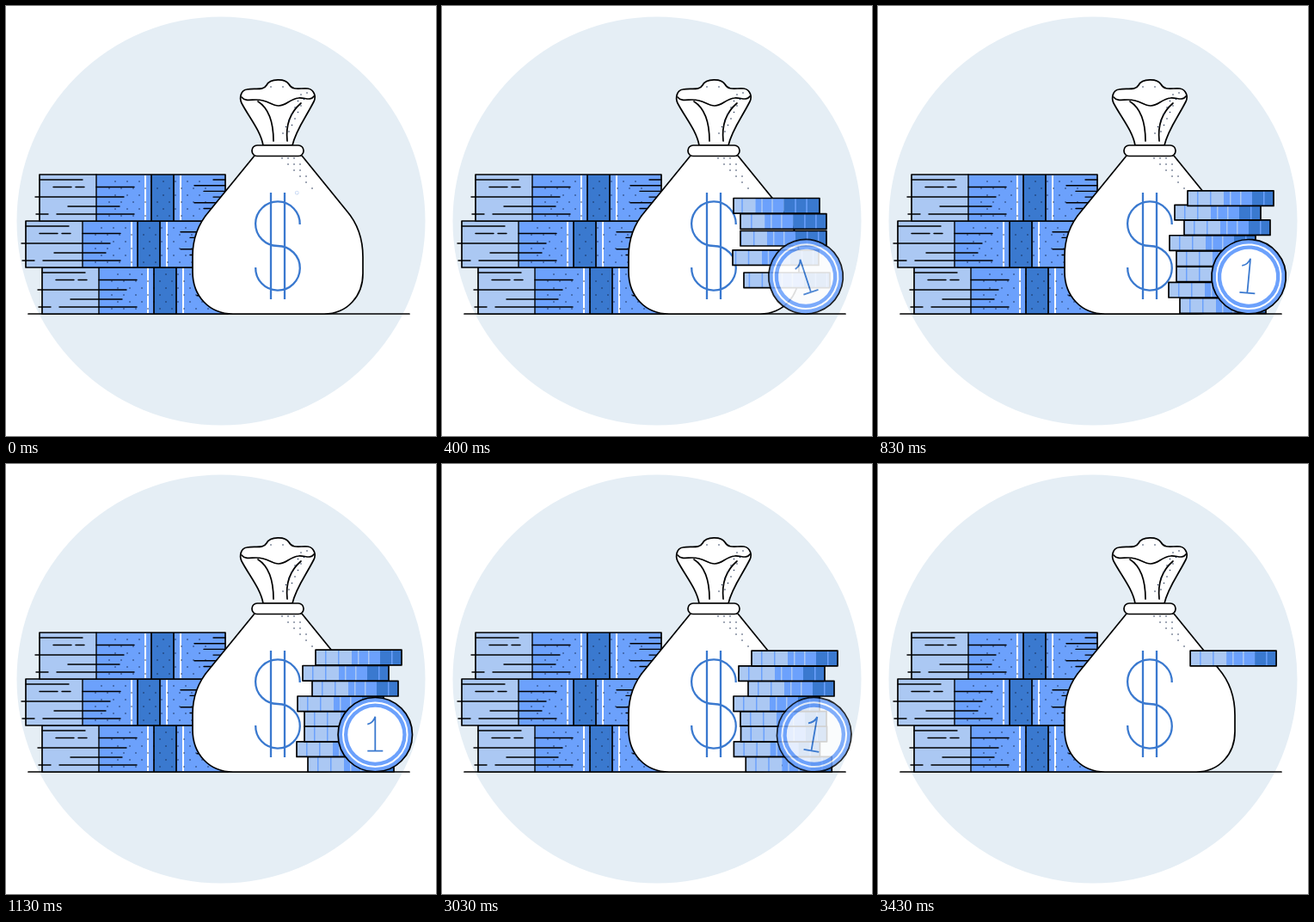
These frames come from a looping animation (500 by 500 pixels, 3.46 s). An HTML page:

```html
<!DOCTYPE html>
<html lang="en">
<head>
<meta charset="utf-8">
<title>Savings</title>
<style>
  html, body { margin: 0; width: 100%; height: 100%; overflow: hidden; background: #fff; }
  svg { display: block; width: 100vw; height: 100vh; }
  .ink { stroke: #000; stroke-width: 1.7; stroke-linecap: round; stroke-linejoin: round; }
  .thin { stroke-width: 1.4; }
  .open { fill: none; }
  .light { fill: #abc8f3; }
  .mid { fill: #6ca1fc; }
  .dark { fill: #3a79cf; }
  .blue { fill: none; stroke: #3a79cf; }
  .white { fill: none; stroke: #fff; stroke-width: 2; }
</style>
</head>
<body>
<svg viewBox="0 0 500 500">
  <defs>
    <g id="bundle">
      <path class="light" d="M0 0H66V54H0z"/>
      <path class="mid" d="M66 0H216V54H66z"/>
      <path class="dark" d="M130 0H156V54H130z"/>
      <path class="white" d="M123 1V53M164 1V53"/>
      <g id="specks"></g>
      <path class="ink open" d="M0 0H216V54H0zM130 0V54M156 0V54"/>
      <path class="ink open thin" d="M66 0V54"/>
      <path class="ink open thin" d="M0 6H50M16 14.5H37M42 14.5H52M66 14.5H110
        M-5 26H98M33 37H93M-4 46H10M20 46H110"/>
      <g id="edges" class="ink thin"></g>
    </g>
    <clipPath id="rim"><path d="M0 0H100V17.6H0z"/></clipPath>
  </defs>

  <circle cx="250" cy="250" r="237.5" fill="#e5eef5"/>
  <path class="ink" d="M26 358H469"/>
  <use href="#bundle" x="42" y="304"/>
  <use href="#bundle" x="23" y="250"/>
  <use href="#bundle" x="39" y="196"/>

  <g class="ink" fill="#fff">
    <path d="M289 174L236 239C223 254 217 270 217 291V309C217 337 236 358 264 358H370C397 358 415 337 415 311V292C415 270 409 253 396 238L344 174z"/>
    <path d="M299 162C296 145 283 130 274 113C271 107 273 98 280 97C290 95 299 99 303 92C307 84 325 84 329 91C333 99 343 95 351 96C358 97 361 105 358 111C349 129 337 144 333 162z"/>
    <path class="open" d="M274 106C278 111 284 109 291 109C305 109 308 116 317 116C326 116 330 108 340 107C347 106 354 111 358 105"/>
    <path class="open" d="M293 111C307 120 311 137 311 157M343 113C330 124 325 138 327 157"/>
    <rect x="286" y="162" width="60" height="12.5" rx="6"/>
  </g>
  <g id="shade"></g>
  <path class="blue" stroke-width="2.3" d="M308 217V341M324 217V341
    M341.7 254A25.8 25.8 0 1 0 316 279A25.8 25.8 0 1 1 290.2 304"/>

  <g id="pile"></g>
  <g id="coin">
    <circle class="mid ink" r="43.2"/>
    <circle class="white" r="37.3"/>
    <circle r="32" fill="#fff"/>
    <path class="blue" stroke-width="1.8" d="M-9 -12Q-2 -14 0 -21V19M-9 19H9"/>
  </g>
</svg>
<script>
const LOOP = 3460, FALL = 292;
const byId = id => document.getElementById(id);
const ramp = (t, from, to) => Math.min(1, Math.max(0, (t - from) / (to - from)));
const smooth = p => p * p * (3 - 2 * p);
const mix = (a, b, p) => a + (b - a) * p;

function add(parent, tag, attrs) {
  const el = document.createElementNS('http://www.w3.org/2000/svg', tag);
  for (const key in attrs) el.setAttribute(key, attrs[key]);
  parent.appendChild(el);
  return el;
}

const speck = (id, cx, cy) => add(byId(id), 'circle', { cx, cy, r: 0.75, fill: '#14264a' });

// Staggered dots and short strokes on the banknotes.
for (let row = 0; row < 6; row++) {
  for (let x = 88 - (row % 2) * 7; x < 200; x += 14) speck('specks', x, 8 + row * 8);
}
for (let i = 0; i < 7; i++) {
  const x = 202 - (i * 2 % 3) * 11;
  add(byId('edges'), 'path', { d: `M${x} ${6 + i * 6.7}H${i % 3 ? 216 : x + 14}` });
}

// Bag shading: rim, neck, then a tapering patch on the shoulder.
speck('shade', 308, 94);
speck('shade', 322, 94);
for (let i = 0; i < 7; i++) {
  for (let j = 0; j < 2; j++) speck('shade', 350 - i * 3.5 - j * 7, 101 + i * 7.5 + j * 2);
}
for (let i = 0; i < 6; i++) {
  for (let j = 0; j < 3 - i / 2; j++) speck('shade', 321 + (i + j) * 7, 177 + i * 7);
}

function bar(parent, tone, x, width = 1.5) {
  add(parent, 'rect', { class: tone, x, width, height: 17.6 });
}

function makeCoin(x, i) {
  const g = add(byId('pile'), 'g', {});
  const tone = add(add(g, 'g', { 'clip-path': 'url(#rim)' }), 'g', {});
  bar(tone, 'light', -30, 72);
  bar(tone, 'mid', 42, 33);
  bar(tone, 'dark', 75, 55);
  [11, 26, 88, 101].forEach(at => bar(tone, 'mid', at));
  [49, 61].forEach(at => bar(tone, 'light', at));
  add(g, 'path', { class: 'ink open', d: 'M0 0H100V17.6H0z' });
  return { g, tone, x, y: 340.4 - i * 17.6, start: 196 + i * 46, end: 3110 + i * 50 };
}

// Left edges from the bottom of the pile to the top.
const coins = [351, 338, 347, 347, 339, 356, 345, 360].map(makeCoin);

// Cubic fall, then one soft rebound that dies out.
function lift(age) {
  if (age < FALL) return 46.5 * (1 - (age / FALL) ** 3);
  return 3.6 * Math.sin(Math.PI * Math.sqrt(ramp(age, FALL, 680)));
}

function outBack(p, s) {
  const u = p - 1;
  return 1 + (s + 1) * u ** 3 + s * u * u;
}

function drawPile(t) {
  for (const c of coins) {
    const on = t >= c.start && t < c.end;
    c.g.setAttribute('display', on ? 'inline' : 'none');
    if (!on) continue;
    const age = t - c.start;
    const x = c.x + 3.6 * ramp(t, c.end - 210, c.end);
    c.g.setAttribute('transform', `translate(${x} ${c.y - lift(age)})`);
    c.tone.setAttribute('transform', `translate(${mix(-18, 0, ramp(age, 0, FALL))} 0)`);
  }
}

function drawCoin(t) {
  const grow = smooth(ramp(t, 60, 380));
  const dx = mix(-91, 0, outBack(ramp(t, 60, 970), 1.2)) + 13 * ramp(t, 2790, 3260) ** 2;
  const dy = mix(-97.5, 0, grow);
  const alpha = mix(0.5, 1, ramp(t, 60, 520)) * (1 - ramp(t, 2980, 3270));
  const coin = byId('coin');
  coin.setAttribute('transform',
    `translate(${429.3 + dx} ${314.7 + dy}) rotate(${dx * 2.9}) scale(${mix(0.05, 1, grow)})`);
  coin.setAttribute('opacity', alpha);
}

const begin = performance.now();
function tick() {
  const t = (performance.now() - begin) % LOOP;
  drawPile(t);
  drawCoin(t);
  requestAnimationFrame(tick);
}
tick();
</script>
</body>
</html>
```
